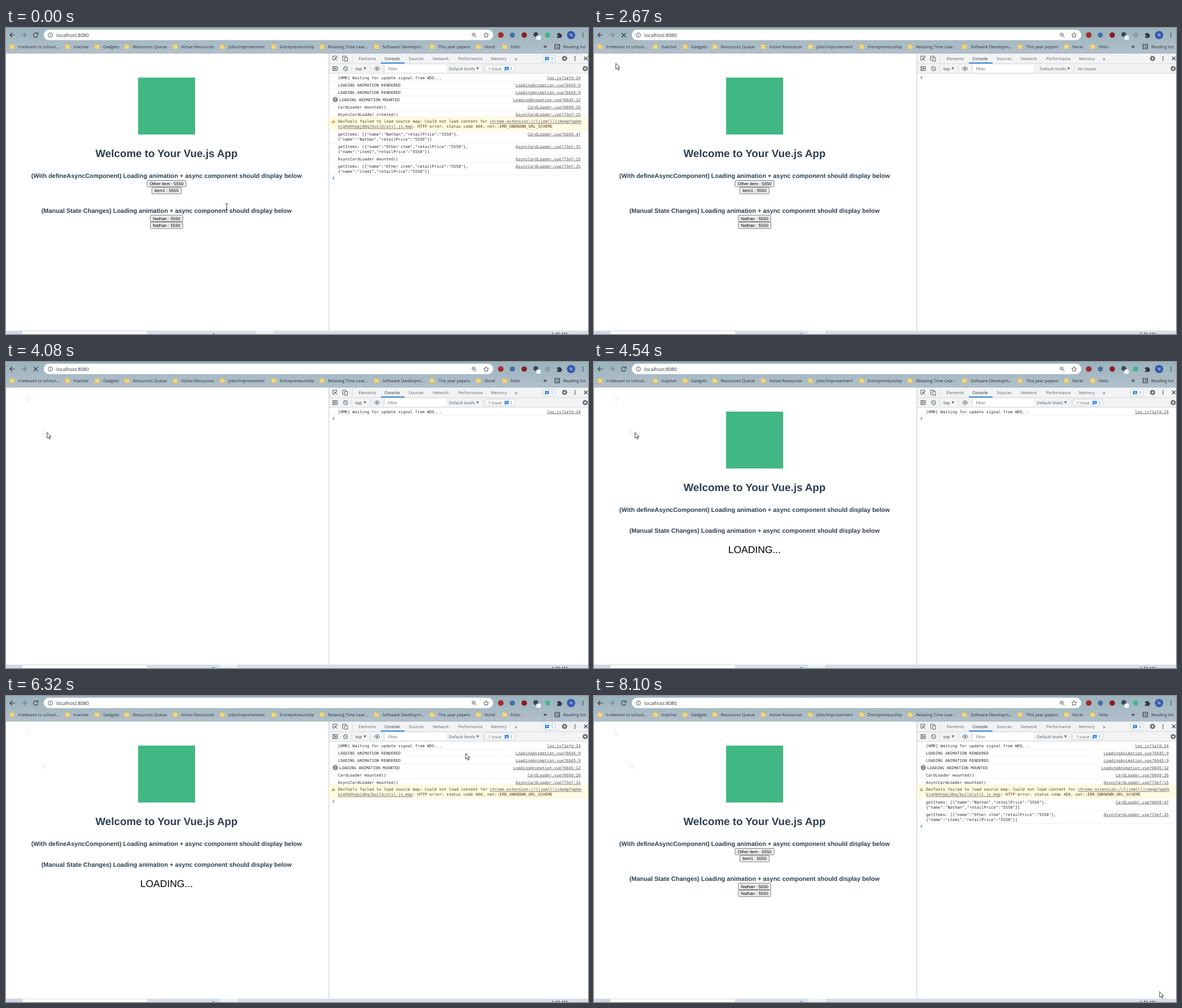
Recreate the animation shown at these times as an HTML page. Size 1031 by 543 pixels, loop 8.17 s.

```html
<!DOCTYPE html>
<html lang="en">
<head>
<meta charset="utf-8">
<title>Async component demo</title>
<style>
html, body { margin: 0; width: 100%; height: 100%; overflow: hidden; background: #fff; }
svg { display: block; width: 1031px; height: 543px; }
text { white-space: pre; text-rendering: geometricPrecision; }
.ui { font: 7.45px "Open Sans", sans-serif; fill: #2b3338; }
.tool { font: 7.2px "Open Sans", sans-serif; fill: #5f6368; }
.mono { font: 7.1px "DejaVu Sans Mono", monospace; fill: #303134; }
.link { fill: #545454; text-decoration: underline; }
.warn { fill: #5c3c00; }
.h1 { font: bold 18.75px "Liberation Sans", Arial, sans-serif; fill: #2c3e50; text-anchor: middle; }
.h3 { font: bold 10.95px "Liberation Sans", Arial, sans-serif; fill: #2c3e50; text-anchor: middle; }
.load { font: 17.5px "Liberation Sans", Arial, sans-serif; text-anchor: middle; }
.btn { font: 7.78px "Liberation Sans", Arial, sans-serif; text-anchor: middle; }
.line { fill: none; stroke: #33393d; stroke-width: 1.2; }
.thin { fill: none; stroke: #54595e; stroke-width: 1; }
</style>
</head>
<body>
<svg id="stage" viewBox="0 0 1031 543"></svg>
<script>
const LOOP = 8170, CLEAR = 2460, DONE = 6990, MID = 284.4;

const rect = (x, y, w, h, fill, more = '') =>
  `<rect x="${x}" y="${y}" width="${w}" height="${h}" fill="${fill}" ${more}/>`;
const dot = (x, y, r, fill) => `<circle cx="${x}" cy="${y}" r="${r}" fill="${fill}"/>`;
const path = (d, cls = 'line', more = '') => `<path d="${d}" class="${cls}" ${more}/>`;
const text = (x, y, s, cls, more = '') => `<text x="${x}" y="${y}" class="${cls}" ${more}>${s}</text>`;
// The times switch the group on, off, on again, and so on.
const during = (times, ...parts) => `<g data-on="${times}">${parts.join('')}</g>`;

// Browser bar
const bookmarks = [
  [21.5, 'Irrelevant to school...'], [119.5, 'Inactive'], [172, 'Gadgets'],
  [224.5, 'Resources Queue'], [310.5, 'Active Resources'], [394, 'Jobs/Improvement'],
  [485, 'Entrepreneurship'], [570.5, 'Relaxing Time Lear...'], [667, 'Software Developm...'],
  [765.5, 'This year papers'], [847.5, 'Norel'], [894, 'Felto']
];
const folder = x =>
  path(`M${x} 29h3l1 1h4v7h-8z`, '', 'fill="#f7d774" stroke="#d9b44a" stroke-width=".5"');
const dots = (x, y) => [-3, 0, 3].map(d => dot(x, y + d, 0.9, '#333')).join('');

const browser = [
  `<defs><linearGradient id="sky" x2="0" y2="1"><stop stop-color="#9ab3bd"/>
   <stop offset="1" stop-color="#b2c0cb"/></linearGradient></defs>`,
  rect(0, 0, 1031, 45, 'url(#sky)'),
  rect(0, 44.5, 1031, 0.7, '#97a6b0'),
  rect(67, 3, 796, 18.5, '#fff', 'rx="9.2"'),
  during('1990 2460', dot(52.5, 12.5, 9.5, '#8ba3ad')),
  path('M15.5 12.5h-8.5M11 8.5l-4 4 4 4'),
  path('M27 12.5h8.5M31.5 8.5l4 4-4 4', 'line', 'opacity=".45"'),
  during('0 2130 4340', path('M56 10.2a4 4 0 1 0 .6 3.2M56.6 8v3h-3')),
  during('2130 4340', path('M49 9l7.5 7.5M56.5 9l-7.5 7.5')),
  `<circle cx="78.5" cy="12.5" r="3.9" class="thin"/>`,
  path('M78.5 12v2.6M78.5 10v1', 'thin'),
  text(89, 15.7, 'localhost:8080', 'ui', 'style="font-size:8.6px"'),
  `<circle cx="828.5" cy="11.7" r="2.8" class="thin"/>`,
  path('M830.5 13.7l3 3M827 11.7h3', 'thin'),
  path('M850.5 8l1.3 3 3.2.3-2.4 2.1.7 3.2-2.8-1.7-2.8 1.7.7-3.2-2.4-2.1 3.2-.3z', 'thin'),
  dot(876.5, 12.5, 5, '#a52b2b'), dot(897, 12.5, 4.5, '#4a6da0'),
  dot(918, 12.5, 4.8, '#8c1c22'), dot(938.5, 11.5, 4.3, '#3b4650'),
  rect(939.5, 13.5, 8, 7.5, '#f2f4f5', 'rx="1.5"'),
  during('0 2460 4540', dot(959.5, 12.5, 4.6, '#41b883')),
  during('2460 4540', dot(959.5, 12.5, 4.6, '#8f9ea6')),
  path('M976 10h2.2a1.6 1.6 0 1 1 3.2 0h2.2v2.3a1.6 1.6 0 1 1 0 3.2v2h-7.6v-2.3a1.5 1.5 0 1 0 0-2.7z', '', 'fill="#30373c"'),
  dot(1001, 12.5, 7.3, '#3558b0'),
  text(1001, 15.3, 'N', 'ui', 'text-anchor="middle" style="fill:#fff"'),
  dots(1022, 12.5),
  ...bookmarks.map(([x, s]) => folder(x - 14.5) + text(x, 35.7, s, 'ui')),
  text(952, 35.7, '»', 'ui', 'style="font-size:10px;font-weight:bold"'),
  during('6740 6990', rect(969, 24, 62, 18, '#98a8b3', 'rx="3"')),
  path('M972.5 29h8v8h-8zM974 31.5h1M976 31.5h3M974 34.5h1M976 34.5h3'),
  text(987, 35.7, 'Reading list', 'ui')
];

// Web page
const heading = y =>
  text(MID, y, '(Manual State Changes) Loading animation + async component should display below', 'h3');
const loading = y => text(MID, y, 'LOADING...', 'load');
const button = (y, w, s) =>
  rect(MID - w / 2, y + 0.5, w, 11.3, '#efefef', 'rx="1.5" stroke="#6b6b6b" stroke-width=".9"') +
  text(MID, y + 8.8, s, 'btn');

const page = [
  during('0 4080 4140',
    rect(234, 88, 101, 101, '#41b883'),
    text(MID, 228.7, 'Welcome to Your Vue.js App', 'h1'),
    text(MID, 266.3, '(With defineAsyncComponent) Loading animation + async component should display below', 'h3')),
  during(`0 4080 ${DONE}`,
    button(270, 69, 'Other item : 5550'), button(282.4, 52, 'item1 : 5550'),
    heading(328),
    button(331.7, 57.5, 'Nathan : 5550'), button(344.1, 57.5, 'Nathan : 5550')),
  during('4140 4200', loading(302), heading(339.8), loading(376)),
  during(`4200 ${DONE}`, heading(302.8), loading(339))
];

// Developer tools
const tabs = [[624.5, 'Elements'], [713.5, 'Sources'], [756, 'Network'], [801, 'Performance'], [859, 'Memory']];
const gear = (x, y) => `<circle cx="${x}" cy="${y}" r="2.8" class="thin" style="stroke-width:1.8"/>` +
  `<circle cx="${x}" cy="${y}" r="4.1" class="thin" style="stroke-width:1.4" stroke-dasharray="1.6 1.62"/>`;
const bar = (x, y) => rect(x, y, 0.7, 11, '#ccc');
const caret = x => path(`M${x} 70h4.6l-2.3 4z`, '', 'fill="#5f6368"');
const bubble = (x, y) => path(`M${x} ${y}h7v5.5h-5l-2 2z`, '', 'fill="#1a73e8"') +
  rect(x + 1.5, y + 1.5, 4, 0.7, '#fff') + rect(x + 1.5, y + 3.2, 4, 0.7, '#fff');
const box = (x, y, w) => rect(x, y, w, 12, '#f8f9fa', 'rx="1.5" stroke="#cacdd1" stroke-width=".8"');
const levels = x => text(x, 74.6, 'Default levels', 'tool', 'style="font-size:7.4px"') + caret(x + 48.5);

const tools = [
  rect(572, 45, 459, 492, '#fff'),
  rect(572, 45, 459, 35.5, '#f1f3f4'),
  rect(572, 62.8, 459, 0.7, '#cacdd1'), rect(572, 80.3, 459, 0.7, '#cacdd1'),
  rect(571.5, 45, 0.9, 492, '#bfc3c7'),
  path('M586 53v-3h-7v7h3M582.5 53.5l4.5 4.5M582.5 57v-3.5h3.5', 'thin'),
  path('M598 58h-1.5v-8h6v1.5M600 52.5h5v6.5h-5z', 'thin'),
  bar(613, 49),
  ...tabs.map(([x, s]) => text(x, 57.2, s, 'tool')),
  text(670.5, 57.2, 'Console', 'tool', 'style="fill:#202124"'),
  rect(664, 61.3, 42, 1.7, '#1a73e8'),
  text(901, 57.5, '»', 'tool', 'style="font-size:10px"'),
  gear(989.5, 54), dots(1008, 54),
  path('M1024 51l6 6M1030 51l-6 6'),
  path('M579 68.5h8v7h-8zM581.2 68.5v7M583.5 70.5l2 1.5-2 1.5z', 'thin'),
  `<circle cx="601.5" cy="72" r="3.7" class="thin"/>`, path('M599 69.5l5 5', 'thin'),
  bar(612, 66.5), text(619, 74.6, 'top', 'tool', 'style="fill:#303134"'), caret(633.5),
  bar(645, 66.5), path('M652.5 72q4.8-6.5 9.6 0q-4.8 6.5-9.6 0z', 'thin'), dot(657.3, 72, 1.6, '#5f6368'),
  bar(669, 66.5), rect(672, 65, 107, 13.5, '#fff'), text(676.5, 74.8, 'Filter', 'tool'),
  during(`0 ${CLEAR} 3210`,
    box(951, 48.3, 21.5), bubble(955, 51.2), text(965.5, 57, '1', 'tool', 'style="fill:#1a73e8"'),
    levels(784.5), bar(845, 66.5),
    box(848.5, 65.8, 53), text(854, 74.6, '1 Issue:', 'tool'), bubble(883.5, 69),
    text(893.5, 74.6, '1', 'tool', 'style="fill:#1a73e8"')),
  during(`${CLEAR} 3210`, levels(790), bar(850, 66.5), text(857, 74.6, 'No Issues', 'tool')),
  gear(1026, 72)
];

const rule = y => rect(572.5, y, 458.5, 0.7, '#ececec');
const source = (y, s) => text(1018, y, s, 'mono link', 'text-anchor="end"');
// One log entry: y is the middle of its first line.
const log = (y, src, lines, x = 588) =>
  lines.map((s, i) => text(x, y + 2.6 + i * 9, s, 'mono')).join('') +
  source(y + 2.6, src) + rule(y + 6.3 + (lines.length - 1) * 9.3);
const items = (y, src, a, b) => log(y, src,
  [`getItems: [{"name":"${a}","retailPrice":"5550"},`, `{"name":"${b}","retailPrice":"5550"}]`]);
const others = y => items(y, 'AsyncCardLoader.vue?73ef:35', 'Other item', 'item1');
const async = (y, what) => log(y, 'AsyncCardLoader.vue?73ef:15', [`AsyncCardLoader ${what}()`]);
const alertIcon = (times, fill) => during(times,
  path('M580 162.3l3.6 6.2h-7.2z', '', `fill="${fill}"`), rect(579.6, 164.3, 0.8, 2.2, '#fff'));
const prompt = (times, y, color) =>
  during(times, path(`M578.7 ${y - 2.4}l2.4 2.4-2.4 2.4`, '', `fill="none" stroke="${color}" stroke-width="1.2"`));

const consoleLog = [
  during(`0 ${CLEAR} 3480`, log(88, 'log.js?1afd:24', ['[HMR] Waiting for update signal from WDS...'])),
  during(`0 ${CLEAR} 4940`,
    log(101, 'LoadingAnimation.vue?6645:9', ['LOADING ANIMATION RENDERED']),
    log(114, 'LoadingAnimation.vue?6645:9', ['LOADING ANIMATION RENDERED']),
    dot(583.3, 127, 4.6, '#80868b'),
    text(583.3, 129.4, '2', 'tool', 'text-anchor="middle" style="fill:#fff;font-size:6.8px"'),
    log(127, 'LoadingAnimation.vue?6645:12', ['LOADING ANIMATION MOUNTED'], 590.5),
    log(140, 'CardLoader.vue?6669:26', ['CardLoader mounted()'])),
  during(`0 ${CLEAR}`, async(153, 'created')),
  during('4940', async(153, 'mounted')),
  during(`0 ${CLEAR} 5450`,
    rect(572.5, 158.6, 458.5, 22.5, '#fffbe5', 'stroke="#fff0b3" stroke-width=".7"'),
    text(588, 168.4, 'DevTools failed to load source map: Could not load content for ' +
      '<tspan class="link">chrome-extension://ljjemllljcmogpfapbk</tspan>', 'mono warn'),
    text(588, 177.4, '<tspan class="link">kighbhhppjdbg/build/util.js.map</tspan>' +
      ': HTTP error: status code 404, net::ERR_UNKNOWN_URL_SCHEME', 'mono warn')),
  alertIcon(`0 ${CLEAR}`, '#e8a21c'), alertIcon('5450', '#b8a650'),
  during(`0 ${CLEAR} ${DONE}`, items(188, 'CardLoader.vue?6669:47', 'Nathan', 'Nathan'), others(210)),
  during(`0 ${CLEAR}`, async(232, 'mounted'), others(245)),
  prompt(`0 ${CLEAR}`, 266.5, '#367cf1'), prompt(`${CLEAR} 3480`, 88, '#6e7a8a'),
  prompt('3480 4940', 100.2, '#6e7a8a'), prompt('4940 5450', 165, '#6e7a8a'),
  prompt(`5450 ${DONE}`, 187, '#6e7a8a'), prompt(DONE, 231.3, '#367cf1')
];

const taskbar = [
  rect(0, 537, 1031, 6, '#d6dfe8'), rect(0, 537, 28.5, 6, '#cfd6e6'),
  rect(28.5, 537.5, 222, 8, '#fff', 'stroke="#ccd2da" stroke-width=".8"'),
  during('0 2130', rect(443, 537, 31, 6, '#e9f3f6')),
  during('2130', rect(379, 537, 31, 6, '#e9f3f6')),
  rect(365, 541.8, 5, 1.2, '#3a9bd6'),
  text(966.5, 545.8, '1:40 AM', 'ui', 'style="fill:#111"')
];

// Pointer
const ARROW = 'M0 0v10.3l2.4-2.2 1.7 3.9 1.7-.8-1.7-3.7h3.2z';
const ghost = (t, x, y) =>
  during(t, path(ARROW, '', `transform="translate(${x} ${y})" fill="#fff" stroke="#e6e6e6" stroke-width=".8"`));
const pointer = `<g id="pointer">
  ${path(ARROW, '', 'id="arrow" fill="#fff" stroke="#111" stroke-width=".8"')}
  ${path('M-2.5-5.3h1.8l.7.6.7-.6h1.8M-2.5 5.3h1.8l.7-.6.7.6h1.8M0-4.7v9.4', '', 'id="beam" fill="none" stroke="#222" stroke-width=".9"')}
</g>`;

const $ = id => document.getElementById(id);
$('stage').innerHTML = [
  ...page, ...tools, ...consoleLog, ...browser, ...taskbar,
  ghost(2680, 36.5, 58), ghost(2890, 64, 118), pointer
].join('');

// [first step, last step, step count, shape, way points]
const moves = [
  [70, 70, 1, 'arrow', [[270, 224]]],
  [800, 1570, 12, 'arrow', [[70.5, 49]]],
  [1640, 1990, 6, 'arrow', [[82, 24], [52, 9.5]]],
  [2320, 2960, 10, 'arrow', [[22, 34], [36.5, 58], [64, 118], [72.7, 125]]],
  [4940, 5300, 6, 'beam', [[241, 231.5]]],
  [5850, 6590, 12, 'arrow', [[340, 232], [1014, 47]]],
  [6670, 6860, 4, 'arrow', [[1005, 26]]],
  [6990, 7420, 7, 'arrow', [[1000, 401]]],
  [7490, 8100, 9, 'arrow', [[985, 440], [1014, 492], [1002, 524.5]]]
];

function along(points, p) {
  const parts = points.slice(1).map((b, i) => Math.hypot(b[0] - points[i][0], b[1] - points[i][1]));
  let d = p * parts.reduce((a, b) => a + b, 0), i = 0;
  while (i < parts.length - 1 && d > parts[i]) d -= parts[i++];
  const [a, b] = [points[i], points[i + 1]], f = d / parts[i];
  return [a[0] + (b[0] - a[0]) * f, a[1] + (b[1] - a[1]) * f];
}

function pointerAt(t) {
  let pos = [391, 317], shape = 'beam';
  for (const [from, to, n, kind, way] of moves) {
    if (t < from) break;
    const step = to > from ? Math.floor((t - from) / (to - from) * (n - 1) + 0.01) : 0;
    const p = Math.min(1, (step + 1) / n);
    pos = along([pos, ...way], p * p * (3 - 2 * p));
    shape = kind;
  }
  return { pos, shape };
}

const groups = [...document.querySelectorAll('[data-on]')]
  .map(el => ({ el, times: el.dataset.on.split(' ').map(Number) }));

function draw(t) {
  for (const { el, times } of groups) {
    el.style.display = times.filter(s => s <= t).length % 2 ? '' : 'none';
  }
  const { pos, shape } = pointerAt(t);
  $('pointer').setAttribute('transform', `translate(${pos})`);
  for (const id of ['arrow', 'beam']) $(id).style.display = id === shape ? '' : 'none';
}

const start = performance.now();
function tick() {
  draw((performance.now() - start) % LOOP);
  requestAnimationFrame(tick);
}
tick();
</script>
</body>
</html>
```
